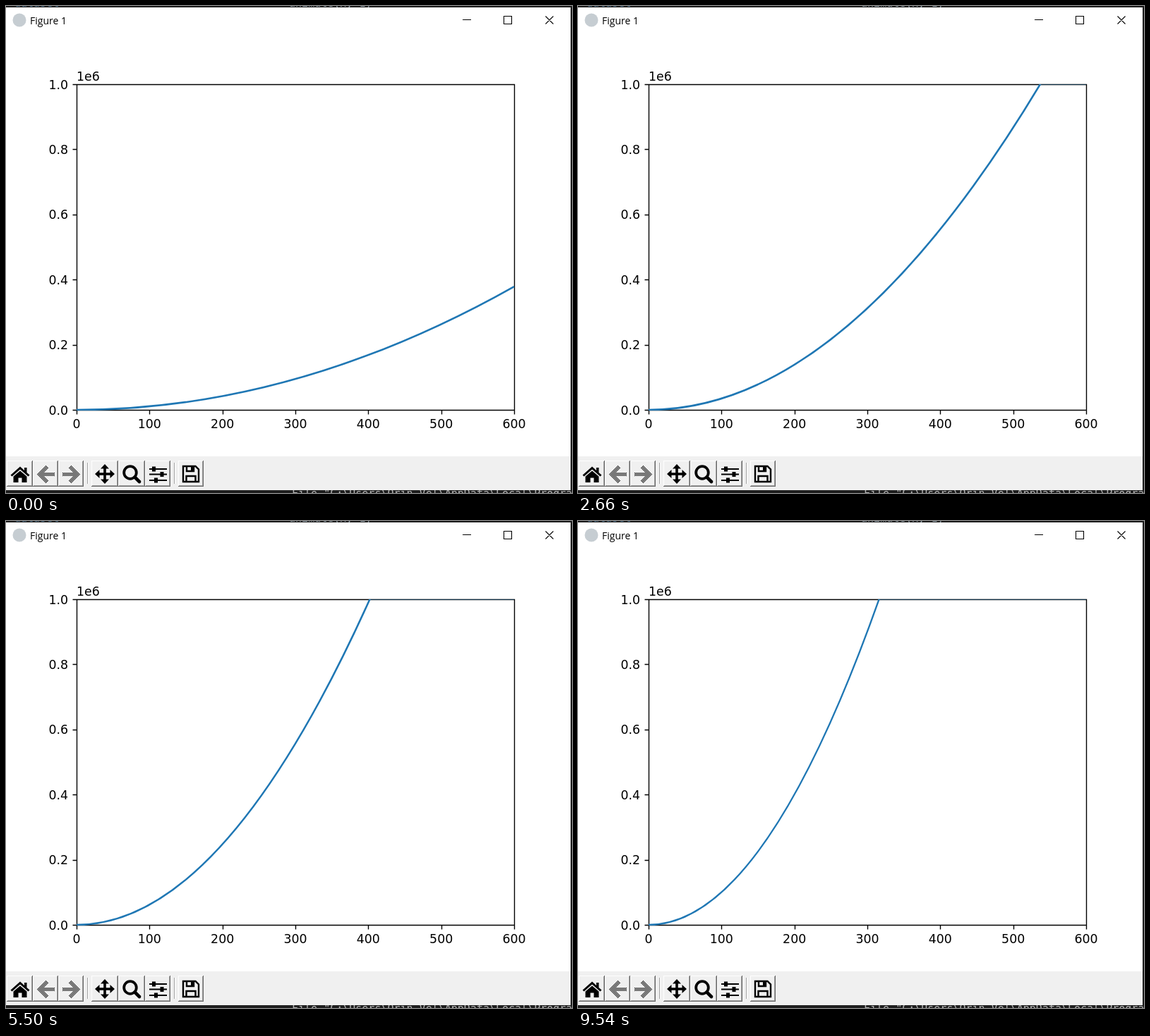
Animation, 802 px wide and 691 px high, one loop 9.63 s. Source, as an HTML page:

```html
<!DOCTYPE html>
<html lang="en">
<head>
<meta charset="utf-8">
<title>Figure 1</title>
<style>
  html, body { margin: 0; width: 100%; height: 100%; overflow: hidden; background: #1e1e1e; }
  svg { display: block; width: 802px; height: 691px; }
  .title { font: 14px "Open Sans", sans-serif; }
  .label { font: 17.36px "DejaVu Sans", sans-serif; }
  .code { font: 15px "DejaVu Sans Mono", monospace; white-space: pre; }
  .spine { fill: none; stroke: #000; stroke-width: 1.39; }
  .curve { fill: none; stroke: #1f77b4; stroke-width: 2.6; }
  .thin { fill: none; stroke: #000; stroke-width: 1.1; }
</style>
</head>
<body>
<svg viewBox="0 0 802 691">
  <defs>
    <clipPath id="axes"><rect x="100" y="111" width="621" height="463"/></clipPath>
    <clipPath id="below"><rect y="687" width="802" height="4"/></clipPath>
    <pattern id="stipple" width="2" height="2" patternUnits="userSpaceOnUse">
      <path d="M0 0h1v1h-1zM1 1h1v1h-1z" shape-rendering="crispEdges"/>
    </pattern>
  </defs>

  <!-- editor behind the window -->
  <rect width="802" height="691" fill="#1e1e1e"/>
  <g class="code">
    <text x="12" y="1" fill="#5b7f9b">dataset</text>
    <text x="383" y="1" fill="#9aa7b0">* animate(x, 1)</text>
    <text x="405" y="697" fill="#b4b4b4" clip-path="url(#below)">File "C:\Users\Orin_Vel\AppData\Local\Progra</text>
  </g>

  <!-- window -->
  <rect y="2" width="800" height="637" fill="#fff"/>
  <rect y="639" width="800" height="48" fill="#f0f0f0"/>
  <circle cx="19" cy="20" r="9.5" fill="#c6cdd2"/>
  <text class="title" x="34" y="26">Figure 1</text>
  <path class="thin" d="M647 19.5h12M705.5 14.5h11v11h-11zM764.5 14.5l11 11M775.5 14.5l-11 11"/>

  <!-- toolbar -->
  <g id="buttons" shape-rendering="crispEdges"></g>
  <path d="M115.5 648v30M238.5 648v30" stroke="#a0a0a0"/>
  <path d="M116.5 648v30M239.5 648v30" stroke="#fff"/>
  <path d="M20 653.5L6.5 665.5L8.5 667.5L20 657.5L31.5 667.5L33.5 665.5L29.5 662V655H26V659Z
           M20 659.5L10.5 667.5V676H17.5V669.5H22.5V676H29.5V667.5Z"/>
  <g fill="none" stroke="url(#stipple)" stroke-width="5">
    <path d="M58.5 653.5L47.5 664.5L58.5 675.5M48 664.5H69"/>
    <path d="M90.5 653.5L101.5 664.5L90.5 675.5M101 664.5H80"/>
  </g>
  <path d="M140 654V674M130 664H150" stroke="#000" stroke-width="3.6"/>
  <path d="M140 650l6 6.5h-12zM140 678l6 -6.5h-12zM126 664l6.5 -6v12zM154 664l-6.5 -6v12z"/>
  <g fill="none" stroke="#000">
    <circle cx="176" cy="662" r="8.8" stroke-width="3.8"/>
    <path d="M182.5 668.5L189 675" stroke-width="4.6" stroke-linecap="round"/>
    <path d="M203 657H228M203 664.5H228M203 673H228" stroke-width="2"/>
    <path d="M209.5 653.5v7M221 661v7M212.5 669.5v7" stroke-width="5"/>
    <path d="M251 653H268.5L273 657.5V675H251ZM256 653V660H266V653M255.5 675V667H268.5V675" stroke-width="2.4"/>
    <path d="M263.5 653V659" stroke-width="3"/>
  </g>

  <!-- plot -->
  <path id="spines" class="spine"/>
  <g id="labels" class="label"></g>
  <path id="residue" stroke="#1f77b4" stroke-opacity=".4" stroke-width="1"/>
  <g clip-path="url(#axes)"><path id="curve" class="curve"/></g>
</svg>
<script>
  const LOOP = 9630;
  const LEFT = 100, RIGHT = 720, TOP = 111, BOTTOM = 573;
  const WIDTH = RIGHT - LEFT, HEIGHT = BOTTOM - TOP;
  const $ = id => document.getElementById(id);

  // Start of each run of 13 redraws; the last entry lies past the loop end.
  const RUNS = [80, 1090, 2090, 3110, 4130, 5110, 6120, 7140, 8150, 9160, 10148];
  // [redraw, coefficient of x squared]
  const GROWTH = [
    [0, 1.052], [11, 1.81], [26, 2.89], [34, 3.467], [39, 3.85], [56, 5.035], [65, 5.73],
    [71, 6.185], [78, 6.68], [92, 7.758], [104, 8.66], [117, 9.61], [123, 10.01]
  ];

  function buildAxes() {
    let d = `M${LEFT + .5} ${TOP + .5}H${RIGHT + .5}V${BOTTOM + .5}H${LEFT + .5}Z`;
    let text = `<text x="${LEFT}" y="106">1e6</text>`;
    for (let i = 0; i <= 6; i++) {
      const x = LEFT + WIDTH * i / 6;
      d += `M${Math.round(x) + .5} ${BOTTOM + .5}v6`;
      text += `<text x="${x}" y="599" text-anchor="middle">${i * 100}</text>`;
    }
    for (let i = 0; i <= 5; i++) {
      const y = BOTTOM - HEIGHT * i / 5;
      d += `M${LEFT + .5} ${Math.round(y) + .5}h-6`;
      text += `<text x="88" y="${y + 6.5}" text-anchor="end">${(i / 5).toFixed(1)}</text>`;
    }
    $("spines").setAttribute("d", d);
    $("labels").innerHTML = text;
  }

  function buildButtons() {
    const spans = [[1, 38], [38, 74], [74, 110], [121, 159], [159, 197], [197, 233], [244, 280]];
    $("buttons").innerHTML = spans.map(([a, b]) =>
      `<path d="M${a + .5} 681V645.5H${b - 1}" fill="none" stroke="#fff"/>
       <path d="M${a + 1} 680.5H${b - 1.5}V646" fill="none" stroke="#a0a0a0"/>
       <path d="M${a} 681.5H${b - .5}V645" fill="none" stroke="#696969"/>`).join("");
  }

  function redrawAt(t) {
    if (t < RUNS[0]) return 0;
    const run = RUNS.findIndex((start, i) => t >= start && t < RUNS[i + 1]);
    const gap = (RUNS[run + 1] - RUNS[run]) / 13;
    let i = 0;
    while (i < 12 && t >= Math.floor((RUNS[run] + (i + 1) * gap) / 10) * 10) i++;
    return 1 + run * 13 + i;
  }

  function coefficient(n) {
    const i = Math.max(1, GROWTH.findIndex(([m]) => m >= n));
    const [n0, k0] = GROWTH[i - 1], [n1, k1] = GROWTH[i];
    return k0 + (k1 - k0) * (n - n0) / (n1 - n0);
  }

  function draw(t) {
    const end = coefficient(redrawAt(t)) * .36;
    $("curve").setAttribute("d",
      `M${LEFT} ${BOTTOM}Q${LEFT + WIDTH / 2} ${BOTTOM} ${RIGHT} ${BOTTOM - HEIGHT * end}`);
    const hit = LEFT + WIDTH / Math.sqrt(end);
    $("residue").setAttribute("d", hit < RIGHT ? `M${hit} ${TOP + .5}H${RIGHT}` : "");
  }

  buildAxes();
  buildButtons();
  draw(0);
  const begin = performance.now();
  (function tick() {
    draw((performance.now() - begin) % LOOP);
    requestAnimationFrame(tick);
  })();
</script>
</body>
</html>
```
